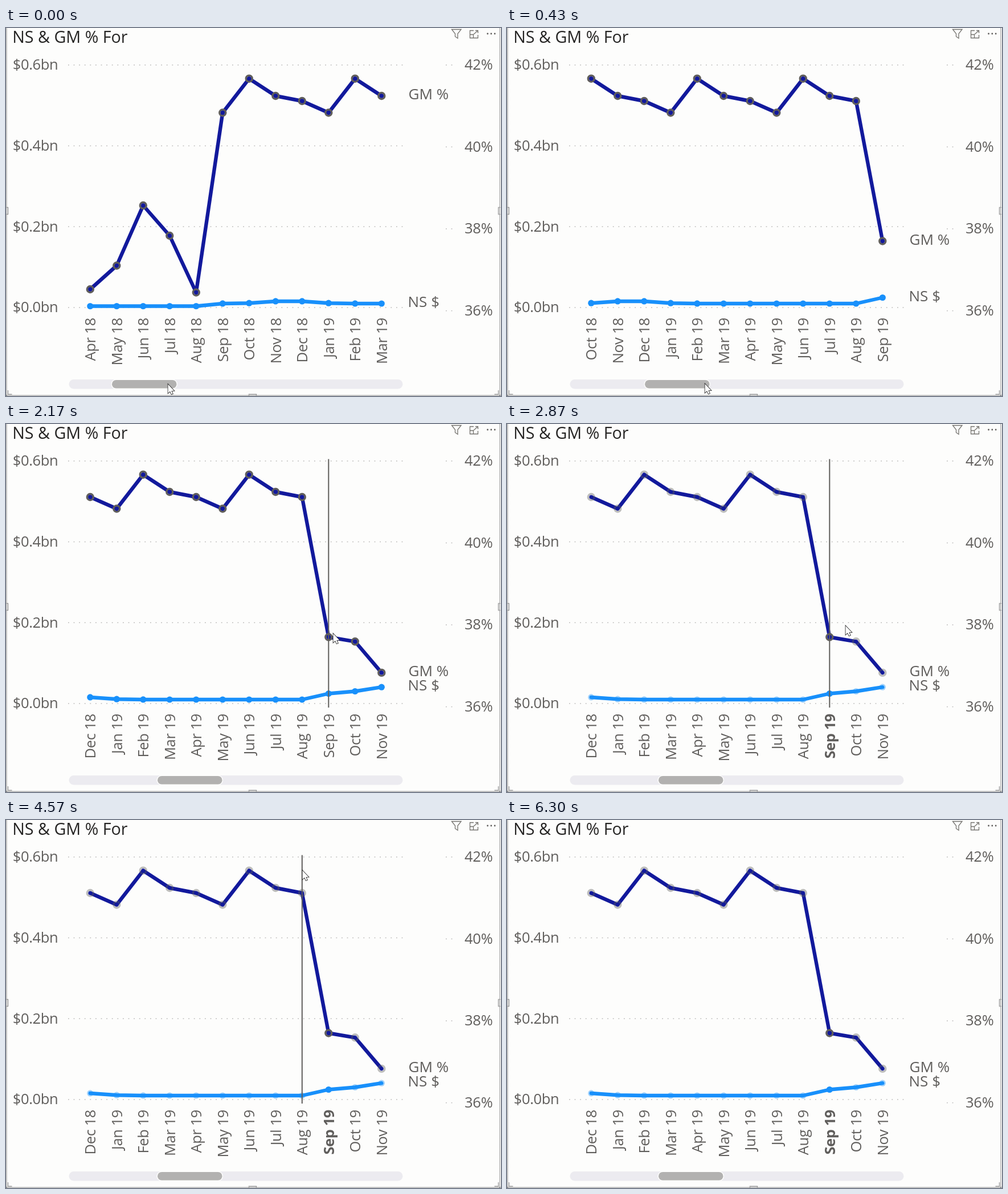
Animation, 869 px wide and 645 px high, one loop 6330 ms. Source, as an HTML page with a canvas:

```html
<!DOCTYPE html>
<html lang="en">
<head>
<meta charset="utf-8">
<title>Line chart</title>
<style>
html, body { margin: 0; width: 100%; height: 100%; overflow: hidden; background: #fdfdfc; }
canvas { display: block; width: 869px; height: 645px; }
</style>
</head>
<body>
<canvas id="chart" width="869" height="645"></canvas>
<script>
const ctx = document.getElementById('chart').getContext('2d');
const LOOP = 6330, W = 869, H = 645;
const PAPER = '#fdfdfc', GREY = '#605e5c', NAVY = '#12199c', BLUE = '#1890fb';
const FAMILY = '"Open Sans", "Noto Sans", sans-serif';
const MONTHS = 'Jan Feb Mar Apr May Jun Jul Aug Sep Oct Nov Dec'.split(' ');

const SHOWN = 12, X0 = 147.8, STEP = 46.5;
const TRACK = 111, MONTH_W = 9.43, THUMB_START = 186, THUMB_END = 266;
const DRAG_END = 600, DRAG_LAG = 48, HOVER_LAG = 130, CLICK = 2450;
const RISE = 5, DROP = 17, SELECTED = DROP;

// Pointer stops: time, x, y
const path = [
  [0, 284, 624], [DRAG_END, 372, 623], [970, 456, 374], [2170, 574, 367],
  [3370, 606, 345], [3530, 555, 323], [4570, 520, 88], [4900, 512, -30]
];

const px = i => X0 + STEP * i;
const clamp = (v, lo, hi) => Math.min(hi, Math.max(lo, v));

// Heights on the stage; month 0 is Apr 18
const launch = [458, 416.5, 311, 364, 463.5];
const cycle = [148.5, 88.7, 119, 128];

function margin(n) {
  if (n < RISE) return launch[n];
  if (n < DROP) return cycle[(n - RISE) % 4];
  return 373.5 + 7.8 * (n - DROP) ** 3;
}

function sales(n) {
  if (n < RISE) return 487.5;
  if (n < DROP) return 483 - 5 * Math.exp(-(((n - 7.5) / 1.1) ** 2));
  return 472.5 - 4 * (n - DROP) ** 1.5;
}

// Steady while dragging, eased between stops afterwards
function pointer(t) {
  t = clamp(t, 0, path.at(-1)[0]);
  const i = Math.max(1, path.findIndex(stop => stop[0] >= t));
  const [t0, x0, y0] = path[i - 1], [t1, x1, y1] = path[i];
  let p = (t - t0) / (t1 - t0);
  if (t > DRAG_END) p = p * p * (3 - 2 * p);
  return { x: x0 + (x1 - x0) * p, y: y0 + (y1 - y0) * p };
}

function text(str, x, y, { size = 25.5, color = GREY, align = 'left', weight = 400, gap = 0 } = {}) {
  ctx.font = `${weight} ${size}px ${FAMILY}`;
  ctx.letterSpacing = gap + 'px';
  ctx.textAlign = align;
  ctx.fillStyle = color;
  ctx.fillText(str, x, y);
}

function stroke(points, color, width, close) {
  ctx.beginPath();
  points.forEach(([x, y]) => ctx.lineTo(x, y));
  if (close) ctx.closePath();
  ctx.strokeStyle = color;
  ctx.lineWidth = width;
  ctx.stroke();
}

function disc(x, y, r, color) {
  ctx.beginPath();
  ctx.arc(x, y, r, 0, Math.PI * 2);
  ctx.fillStyle = color;
  ctx.fill();
}

function pill(x, y, w, h, color) {
  ctx.beginPath();
  ctx.roundRect(x, y, w, h, h / 2);
  ctx.fillStyle = color;
  ctx.fill();
}

function drawBorder() {
  ctx.fillStyle = '#8c8c8c';
  for (let y = 0; y < H; y += 2) {
    for (const x of [0, W - 3]) {
      ctx.fillRect(x, y, 1, 1);
      ctx.fillRect(x + 1, y + 1, 1, 1);
    }
  }
  for (let x = 0; x < W; x += 2) {
    ctx.fillRect(x, H - 2, 1, 1);
    ctx.fillRect(x + 1, H - 1, 1, 1);
  }
  const color = '#a0a0a0', base = H - 3;
  for (const [edge, dir] of [[0, 1], [W - 1, -1]]) {
    const inner = edge + 3.5 * dir;
    stroke([[edge, 314.5], [inner, 314.5], [inner, 326.5], [edge, 326.5]], color, 1.5);
    stroke([[inner, base - 7], [inner, base], [inner + 7 * dir, base]], color, 1.5);
  }
  stroke([[426.5, H], [426.5, base], [439.5, base], [439.5, H]], color, 1.5);
}

function drawIcons() {
  const color = '#75736f';
  stroke([[782.5, 2.5], [799, 2.5], [793, 10], [793, 18], [788.5, 15], [788.5, 10]], color, 1.3, true);
  stroke([[821, 4.5], [814.5, 4.5], [814.5, 17.5], [828.5, 17.5], [828.5, 12]], color, 1.3);
  stroke([[814.5, 11.5], [820.5, 11.5], [820.5, 17.5]], color, 1.3);
  stroke([[821, 11], [828.5, 4.5]], color, 1.3);
  stroke([[824, 4.5], [828.5, 4.5], [828.5, 9]], color, 1.3);
  for (let i = 0; i < 3; i++) disc(845.5 + i * 6.3, 10, 1.4, GREY);
}

function dots(x0, x1, y) {
  ctx.fillStyle = '#bfbebd';
  for (let x = x0; x < x1; x += 9.6) ctx.fillRect(x, y - 0.8, 1.8, 1.6);
}

function drawAxes() {
  for (let i = 0; i < 4; i++) {
    const left = 64.8 + i * 141.7, right = 64.8 + i * 143.6;
    dots(109, 697, left);
    dots(772, 786, right);
    text(`$0.${6 - 2 * i}bn`, 11.8, left + 8.4, { gap: -0.4 });
    text(`${42 - 2 * i}%`, 854.5, right + 8.4, { align: 'right', gap: -0.2 });
  }
}

function drawMonths(first, chosen) {
  for (let i = 0; i < SHOWN; i++) {
    const n = first + i + 3;
    const bold = chosen && first + i === SELECTED;
    ctx.save();
    ctx.translate(px(i) + 9.2, 508);
    ctx.rotate(-Math.PI / 2);
    text(`${MONTHS[n % 12]} ${18 + Math.floor(n / 12)}`, 0, 0,
      { align: 'right', gap: -0.4, weight: bold ? 700 : 400 });
    ctx.restore();
  }
}

function drawSeries(height, first, color, chosen, ringed) {
  const pts = Array.from({ length: SHOWN }, (_, i) => [px(i), height(first + i)]);
  ctx.lineJoin = ctx.lineCap = 'round';
  stroke(pts, color, 6.4);
  ctx.lineJoin = 'miter';
  ctx.lineCap = 'butt';
  pts.forEach(([x, y], i) => {
    ctx.globalAlpha = chosen && first + i !== SELECTED ? 0.4 : 1;
    if (ringed) {
      ctx.beginPath();
      ctx.arc(x, y, 5.4, 0, Math.PI * 2);
      ctx.strokeStyle = GREY;
      ctx.lineWidth = 3.6;
      ctx.stroke();
      disc(x, y, 3.7, color);
    } else {
      disc(x, y, 5.6, color);
    }
  });
  ctx.globalAlpha = 1;
}

function drawHover(t) {
  const p = pointer(t - HOVER_LAG);
  if (p.y < 62 || p.y > 497) return;
  const x = px(clamp(Math.round((p.x - X0) / STEP), 0, SHOWN - 1));
  stroke([[x, 61.5], [x, 497]], GREY, 2);
}

function drawPointer(t) {
  const { x, y } = pointer(t);
  const shape = [[0, 0], [0, 15.5], [3.5, 12.3], [6, 17.5], [8.3, 16.5], [5.9, 11.4], [10.6, 11.2]]
    .map(([dx, dy]) => [x + dx + 0.5, y + dy + 0.5]);
  stroke(shape, '#222', 1.6, true);
  ctx.fillStyle = '#fff';
  ctx.fill();
}

function drawScrollbar(thumb) {
  pill(110.5, 616, 586, 16.5, '#ecebf0');
  pill(thumb - 1.5, 615.5, 116.5, 17.5, PAPER);
  pill(thumb, 617, 113.5, 14.5, '#b2b1b0');
}

function draw(t) {
  const moved = pointer(t - DRAG_LAG).x - path[0][1];
  const thumb = Math.min(THUMB_END, THUMB_START + moved);
  const first = clamp(Math.round((thumb - TRACK) / MONTH_W) - 8, 0, 8);
  const last = first + SHOWN - 1;
  const chosen = t >= CLICK;

  ctx.fillStyle = PAPER;
  ctx.fillRect(0, 0, W, H);
  drawBorder();
  text('NS & GM % For', 11.2, 26.3, { size: 28.7, color: '#252423' });
  drawIcons();
  drawAxes();
  drawMonths(first, chosen);
  drawSeries(sales, first, BLUE, chosen, false);
  drawSeries(margin, first, NAVY, chosen, true);
  text('GM %', 706.5, margin(last) + 6, { size: 26 });
  text('NS $', 705.5, sales(last) + 6, { size: 26 });
  drawScrollbar(thumb);
  drawHover(t);
  drawPointer(t);
}

let start;
function frame(now) {
  start ??= now;
  draw((now - start) % LOOP);
  requestAnimationFrame(frame);
}
draw(0);
requestAnimationFrame(frame);
</script>
</body>
</html>
```
